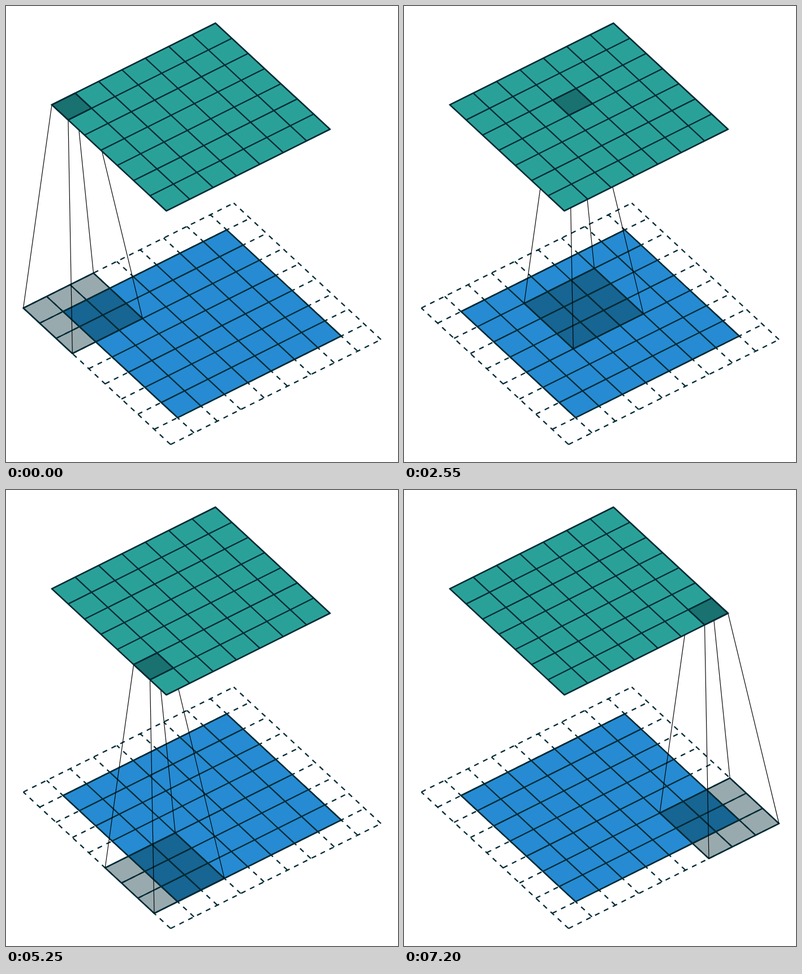
Write an HTML page that moves like this. It is 693 px wide and 808 px high and loops after 7350 ms.

```html
<!DOCTYPE html>
<html lang="en">
<head>
<meta charset="utf-8">
<title>Convolution with padding</title>
<style>
  html, body { margin: 0; width: 100%; height: 100%; overflow: hidden; background: #fff; }
  svg { display: block; width: 693px; height: 808px; }
  .line { fill: none; stroke: #002b36; stroke-width: 2.32; }
  .dashed { stroke-dasharray: 8.716; }
  .shade { fill: #002b36; fill-opacity: 0.4; }
  .link { fill: none; stroke: #000; stroke-width: 1.16; }
</style>
</head>
<body>
<svg id="stage" viewBox="0 0 693 808" xmlns="http://www.w3.org/2000/svg"></svg>
<script>
const SIDE = 7, STEP = 150;
const UNIT = 41.33;
const U = [UNIT, -0.5 * UNIT];
const V = [0.7 * UNIT, 0.65 * UNIT];
const TOP = [81, 175];
const BASE = [30.6, 535.2];
const stage = document.getElementById('stage');

function add(parent, tag, attrs = {}) {
  const el = document.createElementNS(stage.namespaceURI, tag);
  for (const name in attrs) el.setAttribute(name, attrs[name]);
  return parent.appendChild(el);
}

// Point at column c, row r of a slanted grid
const at = (o, c, r) => [0, 1].map(i => (o[i] + c * U[i] + r * V[i]).toFixed(2));
const path = points => 'M' + points.map(p => p.join(' ')).join('L');

function outline(o, n) {
  return path([at(o, 0, 0), at(o, n, 0), at(o, n, n), at(o, 0, n)]) + 'Z';
}

function gridLines(o, n) {
  let d = '';
  for (let i = 0; i <= n; i++) {
    d += path([at(o, 0, i), at(o, n, i)]);
    d += path([at(o, i, n), at(o, i, 0)]);
  }
  return d;
}

function board(parent, o, n, paint) {
  add(parent, 'path', { d: outline(o, n), ...paint });
  add(parent, 'path', { d: gridLines(o, n), class: 'line' });
  add(parent, 'path', { d: outline(o, n), class: 'line' });
}

add(stage, 'path', { d: gridLines(BASE, SIDE + 2), class: 'line dashed' });
board(stage, at(BASE, 1, 1).map(Number), SIDE, { fill: '#268bd2' });

const kernel = add(stage, 'g');
board(kernel, BASE, 3, { class: 'shade' });
for (const [c, r] of [[0, 0], [1, 0], [0, 1], [1, 1]]) {
  add(kernel, 'path', {
    d: path([at(BASE, 3 * c, 3 * r), at(TOP, c, r)]),
    class: 'link'
  });
}

board(stage, TOP, SIDE, { fill: '#2aa198' });
const cell = add(stage, 'g');
board(cell, TOP, 1, { class: 'shade' });

const start = performance.now();
function draw(now) {
  const k = Math.floor(Math.max(0, now - start) / STEP) % (SIDE * SIDE);
  const shift = `translate(${at([0, 0], k % SIDE, Math.floor(k / SIDE))})`;
  kernel.setAttribute('transform', shift);
  cell.setAttribute('transform', shift);
  requestAnimationFrame(draw);
}
draw(start);
</script>
</body>
</html>
```
